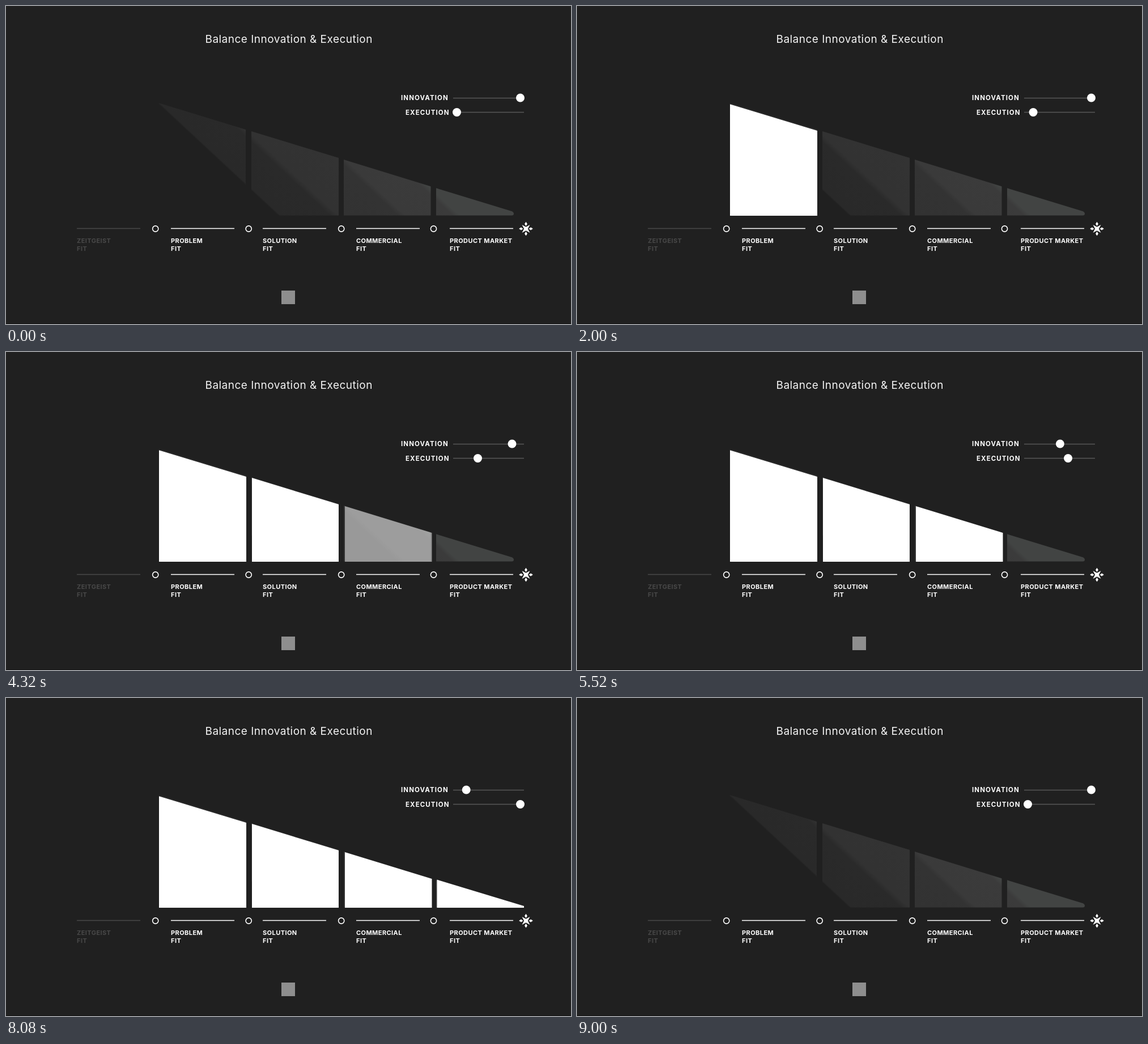
An HTML page for the animation above (9040 ms loop, 997 px wide and 561 px high).

```html
<!DOCTYPE html>
<html lang="en">
<head>
<meta charset="utf-8">
<title>Balance Innovation &amp; Execution</title>
<style>
  html, body { margin: 0; width: 100%; height: 100%; overflow: hidden; background: #202020; }
  svg { display: block; width: 100%; height: 100%; }
  text { font-family: Inter, "Open Sans", sans-serif; fill: #fff; }
  .title { font-size: 19px; font-weight: 400; letter-spacing: .48px; fill: #f4f4f4; }
  .control { font-size: 11.5px; font-weight: 700; letter-spacing: 1.08px; }
  .stage { font-size: 11px; font-weight: 700; letter-spacing: .42px; }
</style>
</head>
<body>
<svg viewBox="0 0 997 561" xmlns="http://www.w3.org/2000/svg">
  <defs>
    <linearGradient id="shade" gradientUnits="userSpaceOnUse" x1="268" y1="172" x2="453.5" y2="-27.4">
      <stop offset="0" stop-color="#202020"/>
      <stop offset=".01" stop-color="#292929"/>
      <stop offset=".23" stop-color="#2a2a2a"/>
      <stop offset=".265" stop-color="#323232"/>
      <stop offset=".53" stop-color="#333"/>
      <stop offset=".56" stop-color="#3a3a3a"/>
      <stop offset=".77" stop-color="#3b3b3b"/>
      <stop offset=".8" stop-color="#424443"/>
    </linearGradient>
  </defs>
  <rect width="997" height="561" fill="#202020"/>
  <g id="scene">
    <text class="title" x="499.2" y="64.8" text-anchor="middle">Balance Innovation &amp; Execution</text>
    <g fill="url(#shade)">
      <path d="M268 173Q268 170.5 271 171.5L423 218V369.5H268Z"/>
      <path d="M433 221L587 268V369.5H433Z"/>
      <path d="M596 271L749.5 318.3V369.5H596Z"/>
      <path d="M759 321.3L893 362.2Q896 363.5 896 366.2Q896 369.5 892.5 369.5H759Z"/>
    </g>
    <g id="bars" fill="#fff"></g>
    <g id="controls"></g>
    <g id="timeline"></g>
    <g id="star" transform="translate(917.5 393)" fill="#fff"></g>
    <rect x="486" y="502" width="24" height="24" fill="#8e8e8e"/>
  </g>
  <rect y="560" width="997" height="1" fill="#141414"/>
</svg>
<script>
const LOOP = 9040, STEP = 40;
const $ = id => document.getElementById(id);

function add(parent, tag, attrs, text) {
  const el = document.createElementNS("http://www.w3.org/2000/svg", tag);
  for (const k in attrs) el.setAttribute(k, attrs[k]);
  if (text) el.textContent = text;
  parent.appendChild(el);
  return el;
}

const rule = (parent, x1, x2, y, stroke) =>
  add(parent, "line", { x1, x2, y1: y, y2: y, stroke, "stroke-width": 1.4 });

// left, right, top left, top right, fade start
const bars = [
  [270, 424, 173.3, 220, 560],
  [434, 587, 222, 268.8, 2280],
  [598, 751.5, 272, 319, 4040],
  [760.5, 914, 320.5, 367, 5800]
].map(([l, r, a, b, start]) => ({
  start,
  el: add($("bars"), "path", { d: `M${l} ${a}L${r} ${b}V370H${l}Z` })
}));

function slider(label, x, y) {
  add($("controls"), "text", { class: "control", x, y: y + 4.2 }, label);
  rule($("controls"), 789, 914, Math.floor(y) + .5, "#575757");
  return add($("controls"), "circle", { cy: y, r: 7.5, fill: "#fff" });
}
const innovation = slider("INNOVATION", 697, 162);
const execution = slider("EXECUTION", 705, 187.5);

[["ZEITGEIST", 125], ["PROBLEM", 291], ["SOLUTION", 453], ["COMMERCIAL", 618], ["PRODUCT MARKET", 783]]
  .forEach(([name, x], i) => {
    const color = i ? "#fff" : "#484848", box = $("timeline");
    rule(box, x, x + 112, 392.5, color);
    [name, "FIT"].forEach((word, row) =>
      add(box, "text", { class: "stage", x, y: 417.7 + row * 14.6, style: `fill:${color}` }, word));
  });
for (const cx of [263.7, 428.2, 591.7, 754.5])
  add($("timeline"), "circle", { cx, cy: 393, r: 5.1, fill: "none", stroke: "#fff", "stroke-width": 1.6 });

add($("star"), "path", { d: "M-7 -7L0 -3.3L7 -7L3.3 0L7 7L0 3.3L-7 7L-3.3 0Z" });
for (let a = 0; a < 360; a += 90)
  add($("star"), "path", { d: "M0 -12.3Q1.4 -10.3 2.4 -8.4L0 -5L-2.4 -8.4Q-1.4 -10.3 0 -12.3Z", transform: `rotate(${a})` });

// start, end, innovation change, execution change
const moves = [
  [1240, 2160, 0, 10.3],
  [3000, 3940, -14.5, 26.7],
  [4720, 5680, -43.5, 36.5],
  [6500, 7560, -37.3, 38.5]
];

const ramp = (t, a, b) => Math.min(1, Math.max(0, (t - a) / (b - a)));
const ease = p => (1 - Math.cos(Math.PI * p)) / 2;

function draw(t) {
  const back = t >= 8700;
  for (const { el, start } of bars)
    el.setAttribute("opacity", back ? 0 : ramp(t, start, start + 560));

  let inn = 907.5, exe = 795.5;
  if (!back) for (const [a, b, di, de] of moves) {
    const p = ease(ramp(t, a, b));
    inn += di * p;
    exe += de * p;
  }
  innovation.setAttribute("cx", inn);
  execution.setAttribute("cx", exe);

  $("scene").setAttribute("opacity", back ? ramp(t, 8700, 9000) : 1 - ramp(t, 8080, 8700));
}

const begin = performance.now();
function tick() {
  const t = (performance.now() - begin) % LOOP;
  draw(Math.floor(t / STEP) * STEP);
  requestAnimationFrame(tick);
}
draw(0);
requestAnimationFrame(tick);
</script>
</body>
</html>
```
